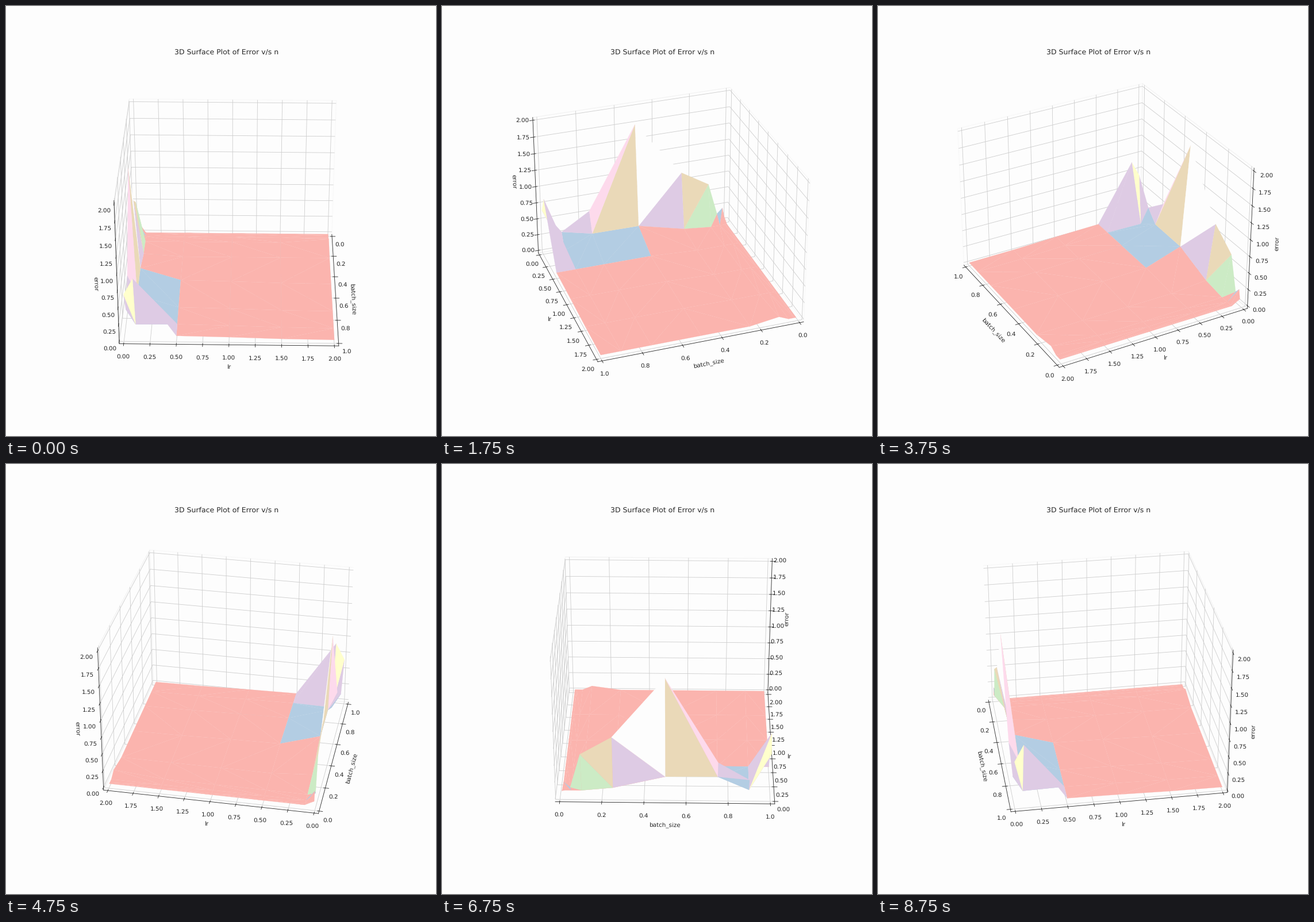
A matplotlib script for the animation above (9000 ms loop, 748 by 748 pixels).

```python
import matplotlib.pyplot as plt
import numpy as np
from matplotlib.animation import FuncAnimation
from matplotlib.colors import ListedColormap
from matplotlib.tri import Triangulation

STEPS = 36
INK, PAPER, SAND = "0.15", "#fdfdfd", "#ead9b8"

plt.rcParams.update({
    "font.family": "DejaVu Sans",
    "text.hinting": "none",
    "figure.facecolor": PAPER,
    "axes.facecolor": PAPER,
    "axes.edgecolor": INK,
    "axes.labelcolor": INK,
    "text.color": INK,
    "xtick.color": INK,
    "ytick.color": INK,
    "grid.color": "0.8",
})

batch = np.array([.01, .02, .05, .1, .25, .5, .75, .9, 1])
lr = np.array([.01, .1, .5, 1, 1.5, 2])


def error_surface(x, y):
    """Low floor with a soft swell, and spikes at the smallest rates."""
    swell = np.clip(4 * x - 1, 0, 1) * np.exp(-1.5 * (y - .5) ** 2)
    z = .01 + .04 * swell
    z[0] = [.08, .213, .135, .63, .885, 1.74, .525, .27, .66]
    z[1, [4, 5, 6, 8]] = .055, .229, .235, .895
    z[-1, 3] = .07
    return z


def grid_triangles(rows, cols):
    """Split every grid cell in two along one diagonal."""
    for j in range(rows - 1):
        for i in range(cols - 1):
            a = j * cols + i
            b, c, d = a + 1, a + cols, a + cols + 1
            falling = i > 5 if j == 0 else i % 3 == 1
            if falling:
                yield from ((a, b, c), (b, d, c))
            else:
                yield from ((a, b, d), (a, d, c))


def padded(hi):
    """Limits from 0 to hi with the usual small 3D margin."""
    return -hi / 48, hi + hi / 48


colors = list(plt.get_cmap("Pastel1").colors)
colors[4] = colors[6] = SAND
colors[8] = PAPER

fig = plt.figure(figsize=(10, 10), dpi=74.8)
ax = fig.add_subplot(projection="3d")
x, y = np.meshgrid(batch, lr)
mesh = Triangulation(x.ravel(), y.ravel(), list(grid_triangles(*x.shape)))
surface = ax.plot_trisurf(mesh, error_surface(x, y).ravel(), linewidth=.2,
                          cmap=ListedColormap(colors), vmin=0, vmax=.95)

ax.set_xlim(*padded(1))
ax.set_ylim(*padded(2))
ax.set_zlim(*padded(2))
ax.set_xticks(np.linspace(0, 1, 6))
ax.set_yticks(np.linspace(0, 2, 9))
ax.set_zticks(np.linspace(0, 2, 9))
for axis in (ax.xaxis, ax.yaxis, ax.zaxis):
    axis.pane.set_fill(False)
ax.set_xlabel("batch_size")
ax.set_ylabel("lr")
ax.set_zlabel("error")
ax.set_title("3D Surface Plot of Error v/s n")
surface.set_edgecolor("face")  # softens the seams between triangles


def update(step):
    ax.view_init(elev=30, azim=1 + step * 360 / STEPS)
    return []


anim = FuncAnimation(fig, update, frames=STEPS, interval=250,
                     repeat=True, repeat_delay=0)
plt.show()
```
